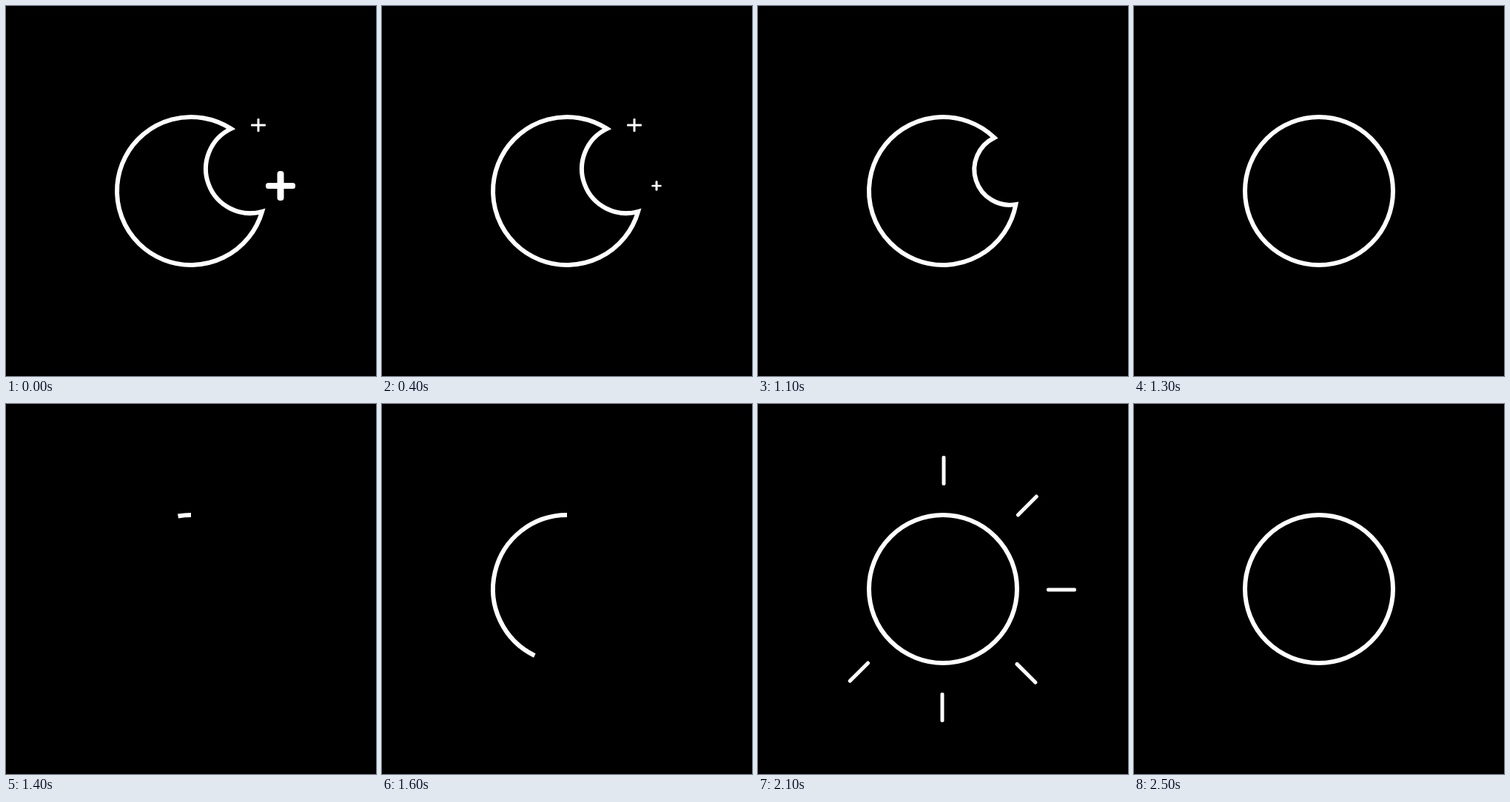
These frames come from a looping animation (500x500 px, 2600 ms). An HTML page:

```html
<!DOCTYPE html>
<html lang="en">
<head>
<meta charset="utf-8">
<title>Moon to sun</title>
<style>
  html, body { margin: 0; width: 100%; height: 100%; overflow: hidden; background: #000; }
  svg { display: block; width: 100%; height: 100%; }
</style>
</head>
<body>
<svg viewBox="0 0 500 500">
  <path id="disc" fill="none" stroke="#fff" stroke-width="6" stroke-miterlimit="10"/>
  <g id="rays" fill="#fff"></g>
  <g id="bigStar" fill="#fff">
    <rect x="-4.5" y="-20" width="9" height="40" rx="4"/>
    <rect x="-20" y="-4" width="40" height="8" rx="3.5"/>
  </g>
  <g id="smallStar" fill="#fff">
    <rect x="-1.5" y="-9" width="3" height="18" rx="1"/>
    <rect x="-10" y="-1.5" width="20" height="3" rx="1"/>
  </g>
</svg>
<script>
const LOOP = 2600, STEP = 100;
const C = 250, R = 100;
const RAY_START = 1801, RAY_TIME = 50, RAY_LENGTH = 40;

const byId = id => document.getElementById(id);
const disc = byId('disc'), raysGroup = byId('rays');
const bigStar = byId('bigStar'), smallStar = byId('smallStar');

const progress = (t, start, length) => Math.min(1, Math.max(0, (t - start) / length));
const mix = (a, b, p) => a + (b - a) * p;

const rays = Array.from({ length: 8 }, (_, i) => {
  const ray = document.createElementNS('http://www.w3.org/2000/svg', 'rect');
  const attrs = { x: 248.5, width: 5, rx: 2, transform: `rotate(${i * 45} ${C} ${C})` };
  for (const key in attrs) ray.setAttribute(key, attrs[key]);
  raysGroup.append(ray);
  return ray;
});

// Circle outline drawn counter-clockwise from the top.
function ring(share) {
  if (share <= 0) return '';
  const top = `M${C} ${C - R}`;
  if (share >= 1) return `${top}A${R} ${R} 0 0 0 ${C} ${C + R}A${R} ${R} 0 0 0 ${C} ${C - R}Z`;
  const a = share * 2 * Math.PI;
  return `${top}A${R} ${R} 0 ${share > 0.5 ? 1 : 0} 0 ${C - R * Math.sin(a)} ${C - R * Math.cos(a)}`;
}

// Disc with a round bite that shrinks and slides out to the right.
function moon(p) {
  const x = mix(80, 130, p), y = mix(-30, -25, p), r = mix(60, 0, p);
  const d = Math.hypot(x, y);
  if (d >= R + r) return ring(1);
  const along = (R * R - r * r + d * d) / (2 * d);
  const half = Math.sqrt(R * R - along * along);
  const ux = x / d, uy = y / d;
  const tip = side => `${C + along * ux - side * half * uy} ${C + along * uy + side * half * ux}`;
  const upper = tip(-1), lower = tip(1);
  return `M${upper}A${R} ${R} 0 1 0 ${lower}A${r} ${r} 0 ${along > d ? 1 : 0} 1 ${upper}Z`;
}

function setStar(star, x, y, scale) {
  star.setAttribute('transform', `translate(${x} ${y}) scale(${scale})`);
  star.setAttribute('visibility', scale > 0 ? 'visible' : 'hidden');
}

function draw(time) {
  const t = Math.floor((time % LOOP) / STEP) * STEP;

  disc.setAttribute('d', t < 1400
    ? moon(progress(t, 900, 400) ** 2.3)
    : ring(progress(t, 1386, 500)));

  setStar(bigStar, 371, 243, 1 - progress(t, 200, 300));
  setStar(smallStar, 341, 161, 1 - progress(t, 600, 200));

  rays.forEach((ray, i) => {
    const size = t < 2500 ? RAY_LENGTH * progress(t, RAY_START + i * RAY_TIME, RAY_TIME) : 0;
    ray.setAttribute('y', 110 - size);
    ray.setAttribute('height', size);
  });
}

const begin = performance.now();
function tick() {
  draw(performance.now() - begin);
  requestAnimationFrame(tick);
}
tick();
</script>
</body>
</html>
```
